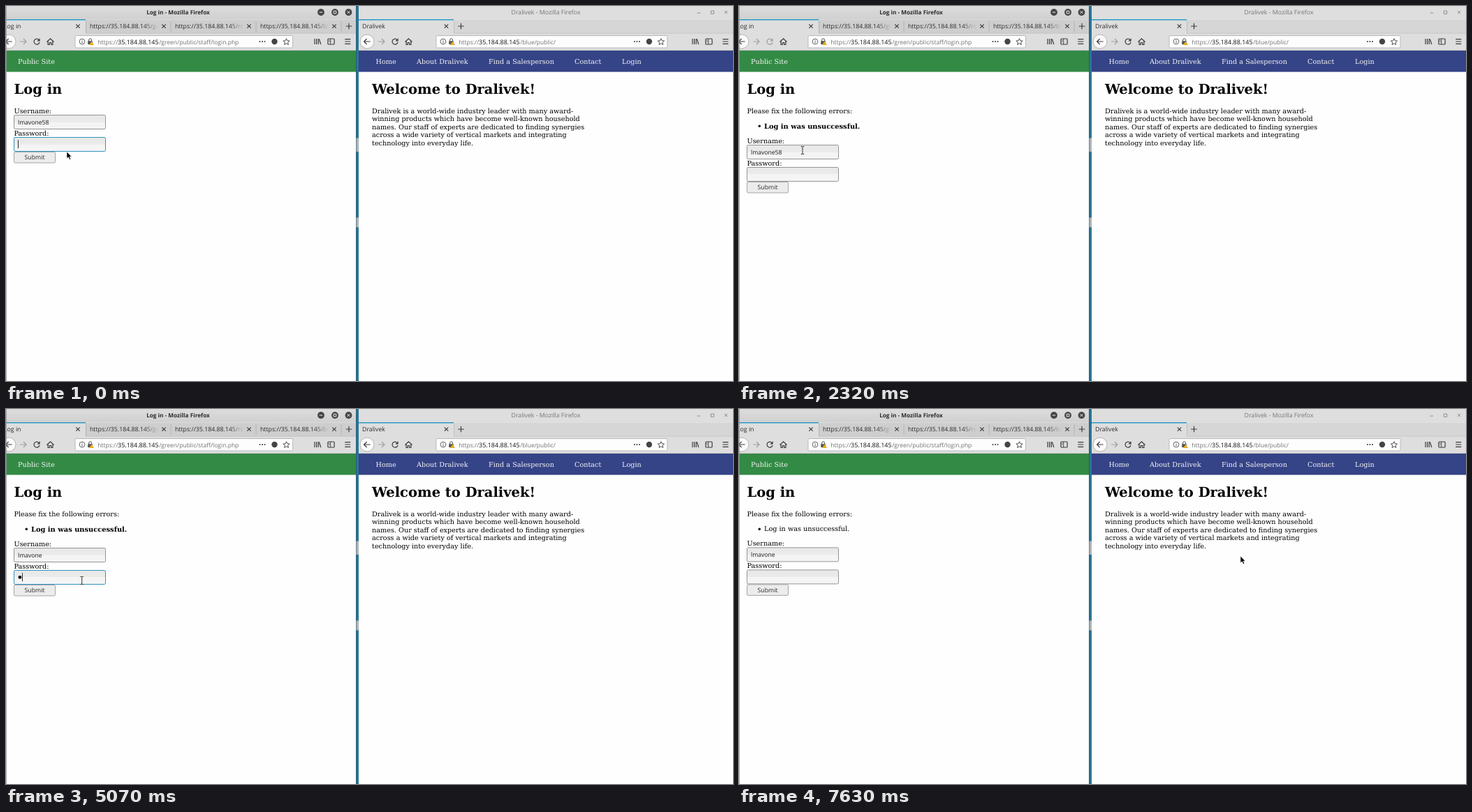
Animation of 1041x538 px, one loop 8 s. Source, as an HTML page:

```html
<!DOCTYPE html>
<html lang="en">
<head>
<meta charset="utf-8">
<title>Two browser windows</title>
<style>
  html, body { margin: 0; width: 100%; height: 100%; overflow: hidden; background: #fefefe; }
  svg { display: block; width: 100%; height: 100%; }
  text { font: 9.68px "DejaVu Serif", serif; text-rendering: geometricPrecision; white-space: pre; }
  .ui { font: 8.75px "Open Sans", "Noto Sans", sans-serif; fill: #2c2c2c; }
  .title { font-weight: 700; font-size: 8.2px; }
  .dim { fill: #757575; }
  .url { font-size: 8.52px; fill: #727272; }
  .host { font-size: 9px; fill: #161616; }
  .input { font-size: 8.6px; fill: #161616; }
  .nav { fill: #f2f4f2; }
  .h1 { font-size: 19.5px; font-weight: 700; }
  .bold { font-size: 9.9px; font-weight: 700; }
  .line { fill: none; stroke: #3c3c3c; stroke-width: 1.2; }
  .thin { stroke-width: .9; }
  .grey { stroke: #a0a0a0; }
</style>
</head>
<body>
<svg id="stage" viewBox="0 0 1041 538" preserveAspectRatio="none"></svg>
<script>
const LOOP = 8000;
const COMPANY = "Dralivek";
const USER = "lmavone58";
const stage = document.getElementById("stage");

const text = (x, y, s, cls = "", attrs = "") => `<text x="${x}" y="${y}" class="${cls}" ${attrs}>${s}</text>`;
const rect = (x, y, w, h, fill, attrs = "") => `<rect x="${x}" y="${y}" width="${w}" height="${h}" fill="${fill}" ${attrs}/>`;
const line = (d, cls = "", attrs = "") => `<path d="${d}" class="line ${cls}" ${attrs}/>`;
const disc = (x, y, r, fill, attrs = "") => `<circle cx="${x}" cy="${y}" r="${r}" fill="${fill}" ${attrs}/>`;
const at = (x, y, body, attrs = "") => `<g transform="translate(${x} ${y})" ${attrs}>${body}</g>`;
const cross = (x, y, r = 2.7, cls = "") => line(`M${x - r} ${y - r}l${2 * r} ${2 * r}m0 ${-2 * r}l${-2 * r} ${2 * r}`, cls);
const plus = x => line(`M${x - 4.3} 29h8.6m-4.3 -4.3v8.6`);

const reloadIcon = line("M3.2 -2.4A4 4 0 1 0 4 .8") + '<path d="M4.6 -4.8V-.6H.4Z" fill="#3c3c3c"/>';

function toolbar(back, bar, barEnd, library, path, reload) {
  const end = barEnd - 9;
  return disc(back, 51, 10, "#fafafa", 'stroke="#a9a9a9" stroke-width=".8"')
    + line(`M${back + 4.6} 51h-9m4 -4l-4 4l4 4`)
    + line(`M${back + 16} 51h9m-4 -4l4 4l-4 4`, "grey")
    + reload
    + line(`M${back + 54.5} 51.5l5 -4.7l5 4.7m-8.4 -1v5h2.2v-3h2.4v3h2.2v-5`)
    + rect(bar, 42.5, barEnd - bar, 17.5, "#fdfdfd", 'rx="1.8" stroke="#b4b4b4" stroke-width=".9"')
    + at(bar + 10, 51, disc(0, 0, 3.9, "none", 'stroke="#555" stroke-width=".9"') + line("M0 -2.2v1M0 -.4v2.7", "thin"))
    + at(bar + 22, 51, line("M-2.4 -.5v-1.7a2 2 0 0 1 4 0v1.7", "thin") + rect(-3.8, -.8, 6.6, 4.8, "#555")
      + '<path d="M1.5 -.5L5 5H-2Z" fill="#e8ab1c"/>')
    + text(bar + 32.3, 54.5, "https://", "ui url")
    + text(bar + 61, 54.5, "35.184.88.145", "ui host")
    + text(bar + 120.2, 54.5, path, "ui url")
    + [-38, -34.5, -31].map(dx => disc(end + dx, 51, 1.05, "#444")).join("")
    + disc(end - 17, 51, 4.2, "#444")
    + at(end, 51.3, line("M0 -4.6L1.3 -1.6L4.6 -1.3L2.1 .9L2.9 4.1L0 2.4L-2.9 4.1L-2.1 .9L-4.6 -1.3L-1.3 -1.6Z", "thin"))
    + at(library, 51, line("M-4 -4v8M-1.4 -4v8M1.2 -4v8M2.4 -3.6l2.4 7.6"))
    + at(library + 19.5, 51, rect(-4.6, -4, 9.2, 8, "none", 'rx="1" class="line"') + line("M-.8 -4v8M-3.2 -1.8h1.2m-1.2 1.8h1.2", "thin"))
    + at(library + 43.3, 51, line("M-4 -3.3h8m-8 3.3h8m-8 3.3h8"));
}

function sideTab(x, name) {
  return text(x, 32.2, "https://35.184.88.145/" + name, "ui")
    + rect(x + 78, 22, 25, 15, "url(#fade)")
    + cross(x + 106, 29) + rect(x + 115.7, 22, .7, 15, "#aaa");
}

function leftChrome() {
  return rect(0, 0, 501, 19.5, "url(#bar)") + rect(0, 19.5, 501, 20, "#cecece") + rect(0, 39, 501, 25, "#dedede")
    + rect(0, 19.3, 114, 20, "#dedede") + rect(0, 19, 114, 1.4, "#2196c4") + rect(114, 21, .7, 18, "#aaa")
    + rect(114, 38.8, 387, .6, "#b5b5b5")
    + text(246.5, 12, "", "ui title", 'id="title" text-anchor="middle"')
    + [451, 471, 490.5].map(x => disc(x, 9, 4.9, "#464646")).join("")
    + '<path d="M448.8 9h4.4M469.2 7.2h3.6v3.6h-3.6ZM488.7 7.2l3.6 3.6m0 -3.6l-3.6 3.6" fill="none" stroke="#eee" stroke-width="1"/>'
    + rect(0, 20.4, 47, 18.3, "#a3c8e8", 'id="flash" rx="2"')
    + text(-3, 32.2, "Log in", "ui", 'id="tab"') + disc(1, 29, 1.3, "#777", 'id="spinner"')
    + cross(103, 29) + sideTab(120, "gre") + sideTab(242, "red") + sideTab(364, "blu") + plus(491)
    + toolbar(4, 99, 410.5, 446, "/green/public/staff/login.php",
      at(44, 51, reloadIcon, 'id="reload"') + at(44, 51, cross(0, 0, 3.7), 'id="stop"'))
    + rect(0, 63.4, 501, .8, "#b0b0b0");
}

function rightWindow() {
  const nav = [[529.5, "Home"], [588, "About " + COMPANY], [691, "Find a Salesperson"], [814, "Contact"], [882, "Login"]];
  const story = [
    COMPANY + " is a world-wide industry leader with many award-",
    "winning products which have become well-known household",
    "names. Our staff of experts are dedicated to finding synergies",
    "across a wide variety of vertical markets and integrating",
    "technology into everyday life."];
  return rect(505, 0, 536, 538, "#fefefe")
    + rect(505, 0, 536, 19.5, "#dedede") + rect(505, 19.5, 536, 20, "#d6d6d6") + rect(505, 39, 536, 25, "#dedede")
    + rect(505, 19.3, 136, 20, "#dedede") + rect(505, 19, 136, 1.4, "#2196c4") + rect(641, 21, .7, 18, "#b5b5b5")
    + rect(641, 38.8, 400, .6, "#bbb")
    + text(773, 12, COMPANY + " - Mozilla Firefox", "ui dim", 'text-anchor="middle"')
    + line("M989.8 10h4.4M1009.4 7h4.2v4.2h-4.2Z", "thin", 'style="stroke:#858585"')
    + at(1031, 9, line("M-2.1 -2.1l4.2 4.2m0 -4.2l-4.2 4.2", "thin", 'style="stroke:#858585"'))
    + text(510, 32.2, COMPANY, "ui") + cross(630.5, 29) + plus(651.5)
    + toolbar(517, 616, 947, 987, "/blue/public/", at(557, 51, reloadIcon))
    + rect(505, 63.4, 536, .8, "#b0b0b0") + rect(505, 64, 536, 30.5, "#354387")
    + nav.map(([x, s]) => text(x, 83.4, s, "nav")).join("")
    + text(524, 126, `Welcome to ${COMPANY}!`, "h1")
    + story.map((s, i) => text(524, 153.6 + i * 11.62, s)).join("");
}

const field = (id, y) => rect(11.5, y, 131, 20, "url(#field)", `id="${id}" rx="1.8" stroke-width="1"`);

function leftPage() {
  return rect(0, 64, 501, 30.5, "#338a45") + text(17, 83.4, "Public Site", "nav")
    + text(11.5, 126, "Log in", "h1")
    + `<g id="errors">${text(11.5, 153.6, "Please fix the following errors:")}${disc(29.3, 172.2, 1.7, "#000")}`
    + text(36, 175.3, "Log in was unsuccessful.", "", 'id="failure"') + "</g>"
    + '<g id="form">' + text(11.5, 153.6, "Username:") + field("userField", 156.5)
    + text(17, 169.6, "", "ui input", 'id="user"')
    + text(11.5, 186, "Password:") + field("passField", 188.5) + '<g id="dots"></g>'
    + rect(11.5, 209.5, 59, 15.5, "#ececec", 'id="button" rx="1.5" stroke="#9c9c9c" stroke-width=".9"')
    + text(41, 220.4, "Submit", "ui", 'id="submit" text-anchor="middle"')
    + rect(0, 0, .9, 12, "#111", 'id="caret"') + "</g>"
    + rect(0, 0, .8, 538, "#999");
}

stage.innerHTML = `<defs>
  <linearGradient id="bar" x2="0" y2="1"><stop stop-color="#dcdcdc"/><stop offset="1" stop-color="#d0d0d0"/></linearGradient>
  <linearGradient id="fade"><stop stop-color="#cecece" stop-opacity="0"/><stop offset=".8" stop-color="#cecece"/></linearGradient>
  <linearGradient id="field" x2="0" y2="1"><stop stop-color="#e8e8e8"/><stop offset=".5" stop-color="#ebebeb"/>
    <stop offset=".5" stop-color="#f4f4f4"/><stop offset="1" stop-color="#f4f4f4"/></linearGradient></defs>`
  + rect(0, 0, 1041, 538, "#fefefe") + leftChrome() + leftPage() + rightWindow()
  + rect(501, 0, 4, 538, "#2b7596") + rect(501, 0, .9, 538, "#245a74")
  + rect(501.5, 189.5, 3.5, 19.5, "#b0b2b3") + rect(501.5, 303.5, 3.5, 14, "#b0b2b3")
  + '<path id="arrow" d="M0 0V9.8L2.3 7.8L4 11.4L5.7 10.6L4.1 7.2H7Z" fill="#000" stroke="#fff" stroke-width=".6"/>'
  + '<path id="beam" d="M-2.3 -5.5H-.6L0 -5L.6 -5.5H2.3M0 -5V5M-2.3 5.5H-.6L0 5L.6 5.5H2.3" fill="none" stroke="#333" stroke-width="1"/>';

const el = Object.fromEntries([...stage.querySelectorAll("[id]")].map(e => [e.id, e]));

const start = {
  pointer: "arrow", pos: [87, 209], focus: "pass", dots: 0, chars: 9, page: 0,
  pressed: false, loading: false, flash: 0, icon: "reload", iconAlpha: 1, titled: true
};
const loaded = { loading: false, flash: 1, icon: "stop", iconAlpha: .4, titled: true };

// Each step changes only the listed parts of the state.
const steps = [
  [120, { pos: [86, 210] }],
  [320, { dots: 1 }],
  [450, { dots: 2, pos: [82, 215] }],
  [580, { pos: [70, 219] }],
  [730, { dots: 3, pos: [67, 220] }],
  [850, { pos: [66, 221] }],
  [990, { focus: "", pressed: true }],
  [1110, { pressed: false }],
  [1240, { loading: true, icon: "stop" }],
  [1500, { pos: [78, 207] }],
  [1650, { page: 1, dots: 0, titled: false, pos: [95, 184] }],
  [1770, { pointer: "beam", pos: [103, 171] }],
  [1900, loaded],
  [2050, { flash: 0 }],
  [2200, { icon: "reload", pos: [99, 190] }],
  [2320, { pos: [91, 207] }],
  [2470, { iconAlpha: 1, focus: "user" }],
  [2860, { pointer: "" }],
  [3260, { chars: 8, pointer: "arrow", pos: [90, 208] }],
  [3410, { chars: 7, pos: [115, 224] }],
  [3530, { pos: [139, 238] }],
  [3680, { pos: [149, 268] }],
  [3840, { pos: [173, 275] }],
  [3990, { pos: [150, 264] }],
  [4110, { focus: "", pos: [125, 252] }],
  [4240, { pointer: "beam", pos: [108.7, 246] }],
  [4390, { focus: "pass" }],
  [5070, { dots: 1 }],
  [5200, { dots: 2, pointer: "arrow", pos: [94, 256] }],
  [5310, { pos: [75, 263] }],
  [5460, { dots: 3, pos: [69, 264] }],
  [5580, { pos: [66, 265] }],
  [6270, { focus: "", pressed: true }],
  [6410, { pressed: false, loading: true, icon: "stop" }],
  [6530, { page: 2, dots: 0, pos: [180, 262] }],
  [6650, { pos: [380, 250] }],
  [6780, { ...loaded, pos: [506, 243] }],
  [6930, { flash: .4, pos: [506, 250] }],
  [7050, { flash: 0, pos: [505, 256] }],
  [7210, { icon: "reload", pos: [504, 245] }],
  [7350, { iconAlpha: 1, pos: [598, 230] }],
  [7500, { pos: [685, 217] }],
  [7630, { pos: [718, 211] }]
];

const show = (e, on) => e.setAttribute("visibility", on ? "visible" : "hidden");
const move = (e, x, y) => e.setAttribute("transform", `translate(${x} ${y})`);

function render(s) {
  el.title.textContent = (s.titled ? "Log in - " : "") + "Mozilla Firefox";
  el.tab.setAttribute("x", s.loading ? 11 : -3);
  show(el.spinner, s.loading);
  el.flash.setAttribute("opacity", s.flash);
  for (const id of ["reload", "stop"]) {
    show(el[id], s.icon === id);
    el[id].setAttribute("opacity", s.iconAlpha);
  }

  show(el.errors, s.page > 0);
  el.failure.setAttribute("class", s.page === 1 ? "bold" : "");
  el.failure.setAttribute("y", s.page === 1 ? 175.5 : 174.9);
  move(el.form, 0, [0, 43, 42.4][s.page]);

  el.user.textContent = USER.slice(0, s.chars);
  el.dots.innerHTML = Array.from({ length: s.dots }, (_, i) => disc(19.9 + 6.1 * i, 198.4, 2.4, "#111")).join("");
  for (const id of ["user", "pass"]) {
    el[id + "Field"].setAttribute("stroke", s.focus === id ? "#3493c0" : "#949494");
  }
  show(el.caret, s.focus);
  el.caret.setAttribute("x", 17 + (s.focus === "user" ? el.user.getComputedTextLength() : 6.1 * s.dots));
  el.caret.setAttribute("y", s.focus === "user" ? 160 : 192.3);

  el.button.setAttribute("fill", s.pressed ? "#b3b3b3" : "#ececec");
  el.submit.setAttribute("x", s.pressed ? 41.6 : 41);
  for (const id of ["arrow", "beam"]) {
    show(el[id], s.pointer === id);
    move(el[id], ...s.pos);
  }
}

let shown = -1;
function tick() {
  const t = performance.now() % LOOP;
  const due = steps.filter(([time]) => time <= t);
  if (due.length !== shown) {
    shown = due.length;
    render(Object.assign({}, start, ...due.map(([, change]) => change)));
  }
  requestAnimationFrame(tick);
}
tick();
</script>
</body>
</html>
```
